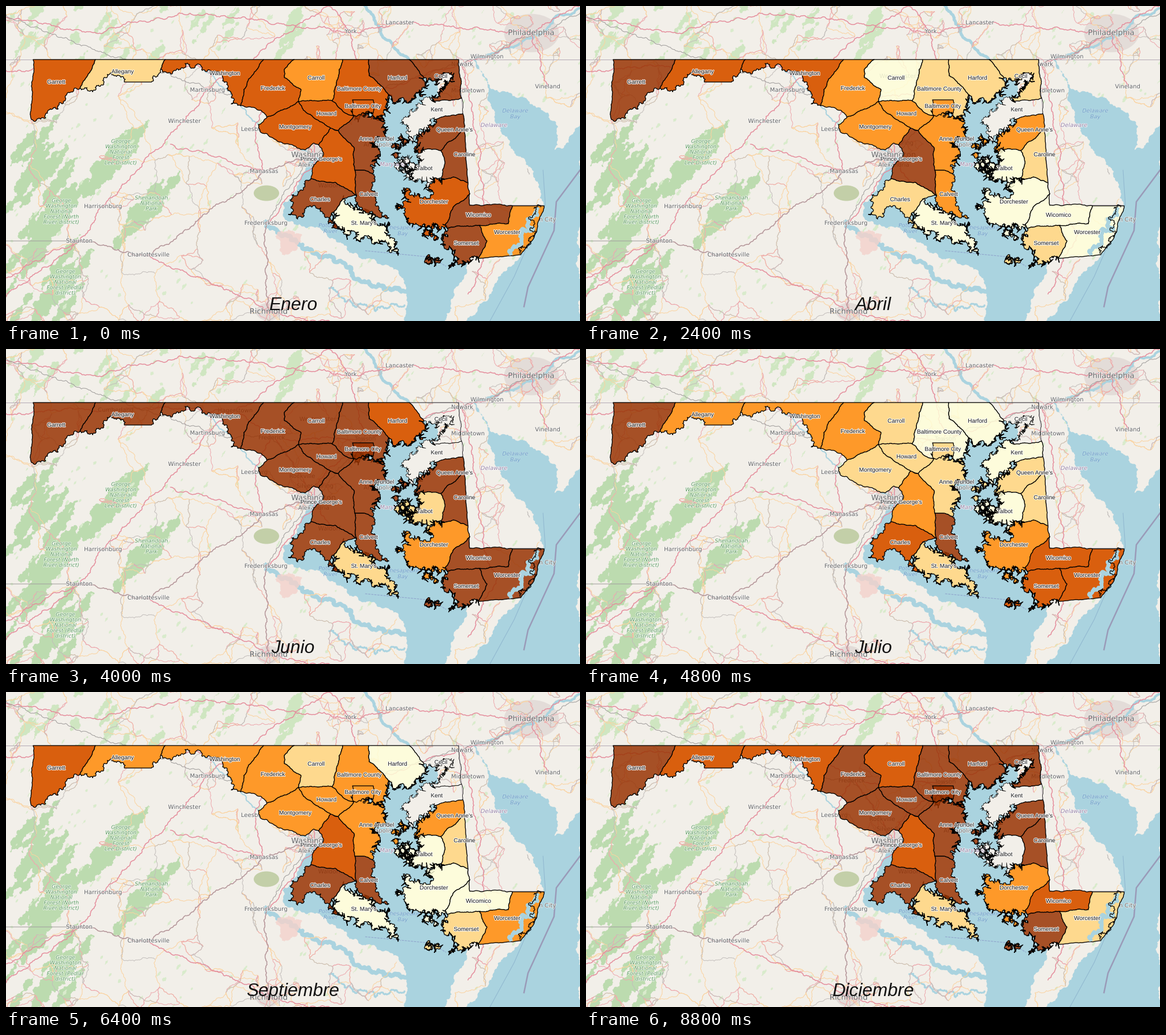
These frames come from a looping animation (994x547 px, 9600 ms). A matplotlib script:

```python
import math
import random

import matplotlib.pyplot as plt
import numpy as np
from matplotlib.animation import FuncAnimation
from matplotlib.collections import LineCollection
from matplotlib.patches import Ellipse, PathPatch, Polygon
from matplotlib.path import Path
from matplotlib.patheffects import withStroke

W, H, DPI = 994, 547, 64
PX = 72 / DPI  # points per pixel
LAND, WATER = "#f2efe9", "#aad3df"
FILLS = [(0, 0, 0, 0), (1, 1, 0.85, 0.85), "#fed98e", "#fe9929", "#d95f0e",
         (0.6, 0.204, 0.016, 0.85)]
MONTHS = ("Enero Febrero Marzo Abril Mayo Junio Julio Agosto Septiembre "
          "Octubre Noviembre Diciembre").split()
KEY_MONTHS = [MONTHS.index(m) for m in
              ("Enero", "Abril", "Junio", "Julio", "Septiembre", "Noviembre", "Diciembre")]

fig = plt.figure(figsize=(W / DPI, H / DPI), dpi=DPI, facecolor=LAND)
ax = fig.add_axes([0, 0, 1, 1])
ax.set(xlim=(0, W), ylim=(H, 0))
ax.axis("off")
rng = random.Random(14)


def rough(points, amp):
    """Fractal line; a segment looks the same from either direction."""
    out = [points[0]]
    for a, b in zip(points, points[1:]):
        lo, hi = sorted((a, b))
        dice = random.Random(f"{lo}{hi}")
        seg = [lo, hi]
        while amp and lo[1] != hi[1] and math.dist(*seg[:2]) > 3:
            finer = [lo]
            for p, q in zip(seg, seg[1:]):
                size = math.dist(p, q) or 1
                k = amp * dice.choice((-1, 1)) * dice.uniform(0.5, 1) * min(1, 18 / size)
                finer += [((p[0] + q[0] - (q[1] - p[1]) * 2 * k) / 2,
                           (p[1] + q[1] + (q[0] - p[0]) * 2 * k) / 2), q]
            seg = finer
        out += (seg if a == lo else seg[::-1])[1:]
    return out


def creeks(points, dice):
    """Add narrow spikes, so that a shore looks cut by inlets."""
    out = []
    for x, y in points:
        out.append((x, y))
        if dice.random() < 0.3:
            angle, reach = dice.uniform(0, math.tau), dice.uniform(2, 8)
            out += [(x + reach * math.cos(angle), y + reach * math.sin(angle)), (x + 1, y + 1)]
    return out


def text(s, x, y, px, color="#666666", font="DejaVu Sans", halo=1.5, z=6, **kw):
    return ax.text(x, y, s, fontsize=px * PX, color=color, family=font, zorder=z,
                   ha="center", va=kw.pop("va", "center"), linespacing=1.05,
                   path_effects=[withStroke(linewidth=halo * PX, foreground=(1, 1, 1, 0.85))],
                   **kw)


def line(points, color, px, z=4, amp=0.15, **kw):
    x, y = zip(*rough(points, amp))
    ax.plot(x, y, color=color, lw=px * PX, zorder=z, solid_joinstyle="round", **kw)


def area(points, color, z, amp=0.2, **kw):
    shape = rough(points + points[:1], amp)
    ax.add_patch(Polygon(shape, fc=color, ec="none", zorder=z, **kw))
    return Path(shape)


# ---- base map names
PLACES = {
    "Philadelphia": (910, 47), "York": (597, 44), "Lancaster": (682, 29),
    "Wilmington": (833, 88), "Newark": (790, 101), "Middletown": (800, 147),
    "Vineland": (938, 140), "Martinsburg": (349, 146), "Winchester": (309, 200),
    "Leesburg": (430, 214), "Washington": (533, 259), "Alexandria": (533, 276),
    "Manassas": (447, 287), "Harrisonburg": (168, 348), "Fredericksburg": (450, 377),
    "Staunton": (127, 408), "Charlottesville": (247, 432), "Richmond": (455, 531),
    "Ocean City": (925, 371), "Annapolis": (644, 241), "Waldorf": (560, 312),
    "Towson": (622, 156), "Rockville": (513, 221), "Silver Spring": (535, 238),
    "Frederick": (460, 154), "Hagerstown": (397, 107), "Cumberland": (190, 106),
    "Westminster": (540, 122)}
BIG = ("Philadelphia", "Washington", "Richmond")
for name, spot in PLACES.items():
    text(name, *spot, 13.2 if name in BIG else 10.1)

forest = "George\nWashington\nNational\nForest"
WOODS = {forest + "\nLee District)": (199, 254), forest + " (North\nRiver district)": (96, 357),
         forest + " (Pedlar\ndistrict)": (103, 480), "Shenandoah\nNational\nPark": (252, 343)}
for name, spot in WOODS.items():
    text(name, *spot, 9.2, "#5f9b62", style="italic")
for name, x, y in [("Delaware\nBay", 882, 187), ("Chesapeake\nBay", 687, 390),
                   ("Potomac\nRiver", 562, 386)]:
    text(name, x, y, 9.5, "#6c9fc8", halo=0.5, style="italic")
for name, x, y in [("Delaware", 845, 207), ("Maryland", 670, 275)]:
    text(name, x, y, 9.8, "#9a86a8", style="italic")


# ---- woodland: lens shapes running from south-west to north-east
def ridge(x, y, length, width, color="#bcdbaf"):
    ux, uy = 0.58, -0.81
    left, right = [], []
    for t in np.linspace(-1, 1, max(4, int(length / 18))):
        half = width / 2 * (1 - 0.8 * t * t) * rng.uniform(0.6, 1.2)
        cx, cy = x + ux * t * length / 2, y + uy * t * length / 2
        left.append((cx - uy * half, cy + ux * half))
        right.append((cx + uy * half, cy - ux * half))
    area(left + right[::-1], color, 1, 0.25)


for x, y in WOODS.values():
    ridge(x - 22, y + 18, 150, 34)
    ridge(x + 14, y - 8, 120, 26)
for _ in range(22):
    ridge(rng.uniform(-10, 120), rng.uniform(200, H), rng.uniform(50, 120), rng.uniform(10, 28))
for _ in range(24):
    ridge(rng.uniform(0, 520), rng.gauss(40, 25), rng.uniform(25, 80), rng.uniform(8, 20), "#cfe6c1")
for _ in range(320):
    ridge(rng.uniform(0, W), rng.uniform(0, H), rng.uniform(4, 14), rng.uniform(2, 7), "#d9ebcc")

# ---- water
bay = area([(735, 110), (795, 330), (798, 450), (772, 525), (760, 547), (690, 547),
            (694, 505), (684, 470), (655, 450), (592, 425), (545, 388), (486, 372),
            (479, 345), (506, 304), (537, 262), (560, 300), (620, 190), (690, 140)], WATER, 2)
ocean = area([(816, 88), (845, 145), (890, 158), (938, 185), (956, 210), (950, 250),
              (966, 246), (994, 205), (994, 547), (797, 547), (850, 480), (892, 430),
              (930, 347), (914, 288), (880, 252), (850, 205), (834, 140), (810, 95)], WATER, 2)
line([(735, 140), (697, 92), (650, 50), (622, 0)], WATER, 5, 2)
line([(533, 262), (478, 233), (437, 206), (406, 173), (374, 140), (338, 105)], WATER, 2, 2)
line([(816, 90), (925, 50), (950, 20), (994, 4)], WATER, 4, 2)
line([(692, 496), (600, 464), (540, 432), (450, 375)], WATER, 7, 2, 0.3)
line([(690, 520), (640, 530), (560, 490)], WATER, 3, 2, 0.3)
line([(994, 285), (953, 340), (949, 390), (904, 488), (897, 522)], "#9a9ab8", 2.5, 3, 0)
line([(930, 285), (934, 345), (880, 470), (838, 547)], "#8fb6cf", 1, 3, 0)
line([(622, 425), (735, 436), (762, 452)], "#8d9fca", 1, 3, 0, ls="--")

# ---- military areas and built-up areas
area([(466, 400), (490, 388), (513, 398), (505, 418), (478, 432)], "#f4d2cb", 3, hatch="////",
     alpha=0.8)
ax.add_patch(Ellipse((451, 325), 44, 27, fc="#c3cfa8", zorder=3))
for name, size in [("Washington", 66), ("Towson", 48), ("Philadelphia", 95), ("Richmond", 44)]:
    ax.add_patch(Ellipse(PLACES[name], size, size * 0.7, fc="#e3dcd8", zorder=1))

# ---- road network: every town is joined to its nearest neighbours
towns = [(rng.uniform(-15, W + 15), rng.uniform(-15, H + 15)) for _ in range(400)]
for name in BIG + ("Towson", "York"):
    x, y = PLACES[name]
    towns += [(rng.gauss(x, 34), rng.gauss(y, 25)) for _ in range(45)]
nets = {"#fbd3a0": [], "#eda9ae": [], "#c3bebb": []}
for a in towns:
    for b in sorted(towns, key=lambda t: math.dist(a, t))[1:4]:
        road = rough([a, b], 0.16)
        if not any(sea.contains_points(road).any() for sea in (bay, ocean)):
            nets[rng.choices(list(nets), (6, 3, 1.5))[0]].append(road)
for color, roads in nets.items():
    ax.add_collection(LineCollection(roads, colors=color, linewidths=PX, zorder=4))


def route(stops, color, px):
    line([PLACES.get(s, s) for s in stops], color, px, 4)


for stops in [
        [(0, 472), "Staunton", "Harrisonburg", "Winchester", "Martinsburg", "Hagerstown", (560, 0)],
        ["Richmond", "Fredericksburg", "Alexandria", "Silver Spring", "Towson", "Newark",
         "Wilmington", "Philadelphia", (994, 0)],
        [(0, 505), "Staunton", "Charlottesville", "Richmond", (560, 547)],
        ["Washington", "Manassas", (285, 240)],
        [(0, 112), "Cumberland", "Hagerstown", "Frederick", "Towson", "York", (560, 0)],
        ["Frederick", "Rockville", "Washington", "Waldorf"],
        ["Charlottesville", "Manassas", "Leesburg", "Frederick"],
        [(0, 20), (170, 45), (300, 12), "York", "Lancaster", "Philadelphia", "Vineland"],
        ["Newark", "Middletown", (822, 260), (828, 347), (850, 400), (800, 500)]]:
    route(stops, "#e58d9c", 1.5)
for stops in [[(0, 15), (150, 75), "Martinsburg", "Frederick", "Washington"],
              ["Richmond", "Fredericksburg", "Washington", "Towson", "Wilmington", (994, 12)],
              [(0, 408), "Staunton", "Charlottesville", "Manassas", "Washington"]]:
    route(stops, "#a5a2a0", 1.1)
line([(0, 92.5), (W, 92.5)], "#b4aab4", 1)
line([(784, 93), (803, 346), (930, 346)], "#b4aab4", 1, amp=0)

# ---- shared county borders
gar_all = [(155, 93), (128, 143)]
all_was = [(276, 93), (268, 110)]
was_fre = [(446, 93), (420, 127), (412, 145), (406, 173)]
fre_car = [(499, 93), (482, 110), (482, 124), (511, 145), (506, 166)]
fre_mon = [(506, 166), (452, 193)]
car_how = [(506, 166), (565, 165)]
car_bal = [(583, 93), (565, 165)]
bal_how = [(565, 165), (590, 187), (602, 191)]
bal_har = [(628, 93), (629, 121), (668, 157)]
mon_how = [(506, 166), (515, 181), (562, 212)]
mon_pri = [(562, 212), (541, 241)]
how_ann = [(602, 191), (575, 216)]
pri_ann = [(575, 216), (603, 246), (604, 285)]
pri_cal = [(604, 285), (607, 329)]
pri_cha = [(528, 300), (570, 306), (607, 329)]
cha_mar = [(583, 335), (567, 358)]
ann_cal = [(604, 285), (618, 285), (634, 291)]
har_cec = [(698, 93), (724, 125)]
cec_ken = [(789, 160), (737, 164)]
ken_que = [(791, 187), (743, 197)]
que_car = [(794, 215), (768, 235), (753, 251)]
que_tal = [(722, 249), (753, 251)]
car_tal = [(753, 251), (760, 270), (754, 300)]
car_dor = [(754, 300), (775, 297), (800, 307)]
dor_wic = [(803, 326), (774, 350), (761, 379)]
wic_wor = [(877, 347), (870, 378), (820, 381)]
wic_som = [(820, 381), (764, 386)]
som_wor = [(820, 381), (833, 408), (817, 438)]

counties = []


def county(name, at, levels, border, shore=(), amp=0.45, isles=None):
    """Border is calm, shore rugged; levels has one digit a key month, 0 for no data."""
    dice = random.Random(name)
    ring = rough(border, 0.08)
    coast = rough([border[-1], *shore, border[0]], amp if shore else 0.04)
    rings = [ring + (creeks(coast, dice) if shore and amp > 0.4 else coast)]
    if isles:
        x, y, count = isles
        for _ in range(count):
            cx, cy, r = dice.gauss(x, 6), dice.gauss(y, 9), dice.uniform(4, 7)
            loop = [(cx + r * math.cos(k), cy + r * math.sin(k)) for k in range(6)]
            rings.append(creeks(rough(loop + loop[:1], 0.4), dice))
    path = Path.make_compound_path(*(Path(r + r[:1], closed=True) for r in rings))
    ax.add_patch(PathPatch(path, fc=LAND, ec="none", zorder=3))
    patch = ax.add_patch(PathPatch(path, ec="black", joinstyle="round"))
    by_month = np.interp(range(len(MONTHS)), KEY_MONTHS, [int(d) for d in levels])
    counties.append((patch, np.rint(by_month).astype(int)))
    text(name, *at, 10.1, "#222222", "Liberation Sans", 2.2, 9)


RIVER = 0.3
county("Garrett", (87, 132), "4555445", [(44, 197), (47, 93)] + gar_all,
       [(103, 163), (72, 186)], RIVER)
county("Allegany", (202, 114), "2453324", gar_all[::-1] + all_was,
       [(264, 119), (252, 132), (205, 132), (181, 116), (150, 149)], RIVER)
county("Washington", (379, 117), "4453324", all_was[::-1] + was_fre,
       [(390, 170), (390, 152), (375, 130), (338, 105), (310, 100), (290, 113)], RIVER)
county("Frederick", (462, 143), "4353335", was_fre[::-1] + fre_car + fre_mon,
       [(441, 181), (428, 176)], 0.1)
county("Carroll", (537, 125), "3152224", fre_car[::-1] + car_bal + car_how[::-1])
county("Baltimore County", (612, 144), "4251335", bal_how[::-1] + car_bal[::-1] + bal_har,
       [(660, 172), (655, 186), (640, 194), (622, 189)])
county("Harford", (678, 125), "5241135", bal_har[::-1] + har_cec,
       [(727, 142), (708, 158), (692, 164)])
county("Cecil", (753, 122), "5200005", har_cec[::-1] + [(784, 93)] + cec_ken,
       [(760, 144), (774, 122), (742, 136)])
county("Kent", (746, 180), "0001000", cec_ken[::-1] + ken_que,
       [(718, 213), (697, 230), (694, 205), (712, 171)])
county("Queen Anne's", (777, 215), "5352345", ken_que[::-1] + que_car + que_tal[::-1],
       [(708, 255), (714, 228)], isles=(683, 248, 5))
county("Caroline", (794, 258), "5252235", que_car + car_tal + car_dor)
county("Talbot", (725, 282), "0121110", que_tal + car_tal,
       [(738, 320), (712, 303), (714, 264)], isles=(692, 282, 8))
county("Dorchester", (741, 340), "4133123", car_dor + dor_wic,
       [(750, 388), (728, 384), (690, 364), (676, 345), (692, 332), (688, 316), (738, 322)],
       isles=(732, 402, 3))
county("Wicomico", (818, 363), "5154144", wic_som[::-1] + wic_wor[::-1] + [(803, 346)] + dor_wic)
county("Somerset", (797, 412), "5254255", wic_som[::-1] + som_wor,
       [(782, 446), (766, 451), (776, 430), (762, 422), (754, 402)], isles=(738, 434, 3))
county("Worcester", (868, 393), "3154332",
       som_wor[::-1] + wic_wor[::-1] + [(932, 347), (915, 400), (891, 432)], [(840, 436)], 0.04)
line([(920, 352), (912, 385), (890, 400), (874, 430)], WATER, 6, 8, 0.4)
line([(926, 349), (914, 382), (890, 430)], "black", 1.2, 8, 0.45)
county("St. Mary's", (620, 377), "1122112", cha_mar[::-1],
       [(612, 351), (664, 376), (662, 392), (678, 430), (641, 410), (600, 391), (578, 386)], 0.41)
county("Calvert", (628, 327), "5355545", pri_cal[::-1] + ann_cal,
       [(641, 336), (663, 368), (645, 367), (610, 346)], RIVER)
county("Charles", (544, 336), "5254535", pri_cha + cha_mar,
       [(574, 386), (558, 378), (535, 347), (505, 370), (489, 362), (495, 328), (518, 304)], RIVER)
county("Prince George's", (546, 266), "4553444",
       mon_pri[::-1] + pri_ann + pri_cal + pri_cha[::-1], [(536, 274), (550, 257)], 0.12)
county("Anne Arundel", (642, 231), "5352345", how_ann + pri_ann + ann_cal,
       [(638, 268), (642, 246), (634, 237), (656, 224), (655, 205), (628, 190)])
county("Howard", (555, 187), "4352345", mon_how[::-1] + car_how + bal_how + how_ann)
county("Montgomery", (501, 210), "4352335",
       fre_mon[::-1] + mon_how + mon_pri + [(533, 238), (518, 250)],
       [(490, 240), (440, 218), (437, 206)], 0.12)
county("Baltimore City", (618, 174), "4352345",
       [(600, 187), (600, 163), (636, 163), (636, 186)], [(618, 185)], RIVER)

title = ax.text(497, 528, "", fontsize=31.5 * PX, color="#111111", family="Liberation Sans",
                style="italic", ha="center", zorder=10)


def update(month):
    for patch, levels in counties:
        level = levels[month]
        patch.set_facecolor(FILLS[level])
        patch.set_linewidth((1.3 if level else 0.7) * PX)
        patch.set_zorder(7 if level else 6.5)
    title.set_text(MONTHS[month])
    return [title]


anim = FuncAnimation(fig, update, frames=len(MONTHS), interval=800, repeat=True, repeat_delay=0)
plt.show()
```
